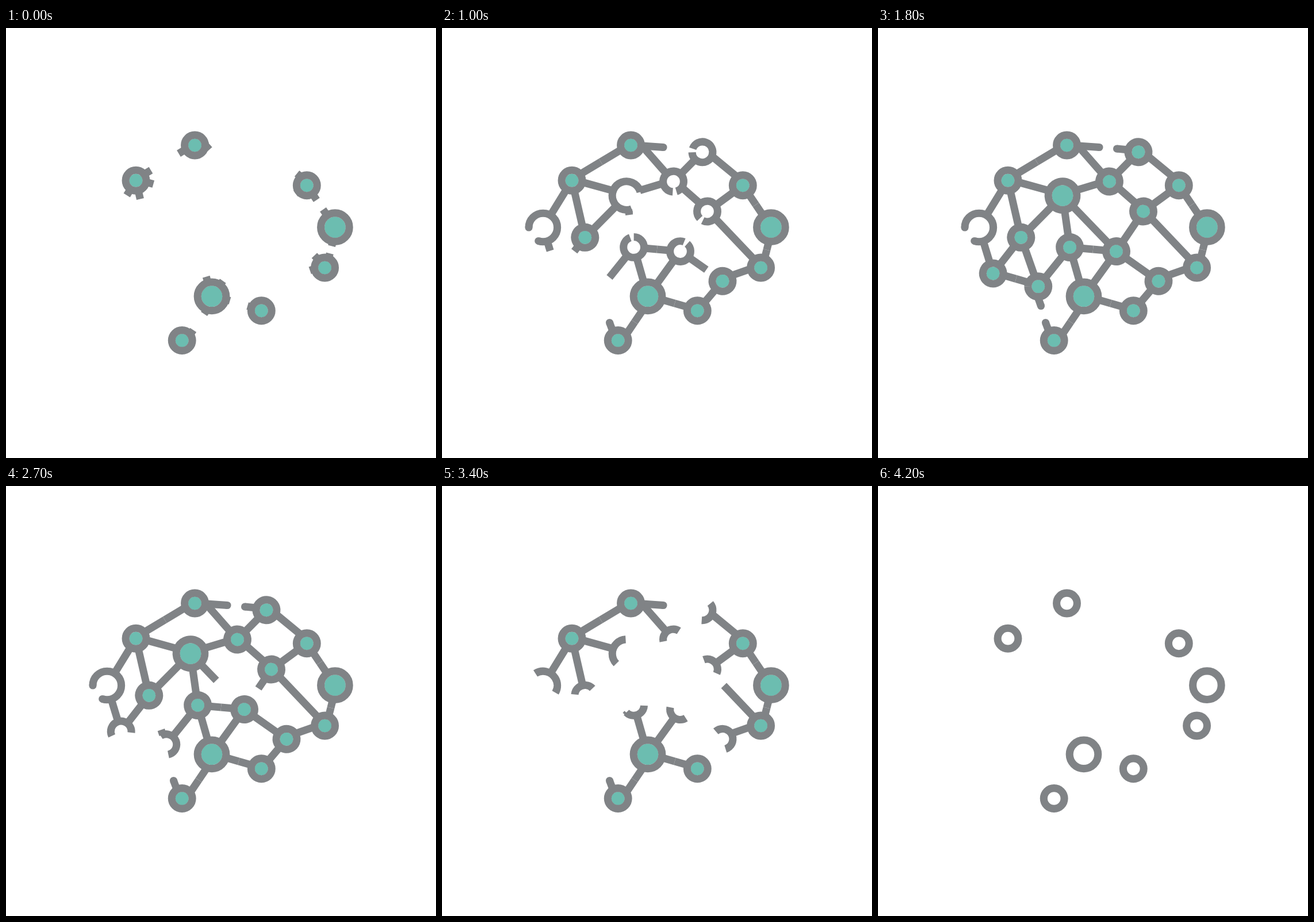
An HTML page with a canvas that plays this animation: 748 px wide and 748 px high, repeating every 4.7 s.

```html
<!DOCTYPE html>
<html lang="en">
<head>
<meta charset="utf-8">
<title>Node network</title>
<style>
  html, body { margin: 0; width: 100%; height: 100%; overflow: hidden; background: #fff; }
  canvas { display: block; }
</style>
</head>
<body>
<canvas id="stage" width="748" height="748"></canvas>
<script>
const ctx = document.getElementById('stage').getContext('2d');
const GRAY = '#808386', TEAL = '#6cbdb0';
const WIDTH = 13.1, SMALL = 17.9, BIG = 24.8, STEP = 100, LOOP = 4700;

// grow: first step, last step, arrival angle, counter-clockwise and clockwise sweep
const node = (x, y, r = SMALL, grow = null) => ({ x, y, r, grow });
const nodes = {
  A: node(328.5, 204),
  B: node(226, 265.2),
  C: node(523.3, 273.8),
  D: node(572.4, 346.7, BIG),
  E: node(554.6, 417),
  F: node(358, 466.8, BIG),
  G: node(444.3, 491.8),
  H: node(306.2, 543.5),
  I: node(453, 215.8, SMALL, [3.4, 10.4, 39, 212, 148]),
  J: node(402.5, 267, SMALL, [3.4, 10.4, 218, 132, 228]),
  K: node(321, 291.6, BIG, [2.4, 12.3, 195.6, 165, 195]),
  L: node(461.5, 319, SMALL, [3.4, 10.4, -36.5, 198, 162]),
  M: node(248.8, 364.3, SMALL, [4.1, 9.3, 252, 183, 177]),
  N: node(333.6, 381.4, SMALL, [3.4, 10.4, 62, 161, 199]),
  O: node(414.5, 388.6, SMALL, [3.4, 10.4, 126, 184, 176]),
  P: node(488, 440.3, SMALL, [3, 8.3, -19.5, 197, 163]),
  Q: node(200.2, 427, SMALL, [11, 14.4, 275, 205, 155]),
  R: node(278.8, 449.6, SMALL, [10.2, 15.2, -51, 129, 231]),
  S: node(175.8, 347, BIG, [3.2, 8.5, -58, 122, 167]),
  T: node(347, 204, 0)
};

// "XY" grows from X to Y, "X=Y" grows from both ends and meets halfway
const edges = [
  [-1.2, 2.5, 'A=B F=H F=G'],
  [-2.5, 2, 'C=D D=E'],
  [-1, 3.3, 'BM BK BS EP FN'],
  [-0.6, 3.3, 'TJ CI CL FO'],
  [-0.9, 8, 'EL'],
  [6, 8.5, 'KM N=O'],
  [5.6, 10.2, 'NR'],
  [6, 10, 'JK'],
  [6.5, 10, 'IJ LJ PG'],
  [6.6, 11.5, 'OP'],
  [8.5, 12, 'SQ'],
  [9.4, 11.5, 'MQ'],
  [9.3, 13, 'KN'],
  [10.7, 15.7, 'LO'],
  [11.4, 15.1, 'KO'],
  [12.3, 16.5, 'RM'],
  [13, 16.5, 'Q=R']
];

// Edges that run beside the line between centres, in px to the right of travel
const shift = {
  'F=H': -6, CI: 5, EP: 4, 'A=B': 2, BK: -2, 'D=E': -2.4,
  EL: 1.5, 'F=G': -1.3, JK: 2, LJ: 2, 'Q=R': -2
};

const stubs = [
  [-0.3, 3, 349, 205, 385, 207.5],
  [-0.3, 3, 298, 530, 291.5, 512.5],
  [10.5, 13, 436, 212, 415.5, 210],
  [13, 16, 277, 465, 283.5, 483.5]
];

const progress = (k, from, to) => Math.min(1, Math.max(0, (k - from) / (to - from)));
const rad = deg => deg * Math.PI / 180;

function dot(x, y, r, color) {
  ctx.fillStyle = color;
  ctx.beginPath();
  ctx.arc(x, y, r, 0, 2 * Math.PI);
  ctx.fill();
}

function line(x1, y1, x2, y2, p) {
  if (p <= 0) return;
  ctx.beginPath();
  ctx.moveTo(x1, y1);
  ctx.lineTo(x1 + (x2 - x1) * p, y1 + (y2 - y1) * p);
  ctx.stroke();
}

function drawEdge(key, p) {
  const a = nodes[key[0]], b = nodes[key[key.length - 1]], both = key[1] === '=';
  const dx = b.x - a.x, dy = b.y - a.y, d = Math.hypot(dx, dy), side = shift[key] || 0;
  const at = s => [a.x + (dx * s - dy * side) / d, a.y + (dy * s + dx * side) / d];
  const start = at(a.r), end = at(d - b.r);
  line(...start, ...end, both ? p / 2 : p);
  if (both) line(...end, ...start, p / 2);
}

function drawNode(id, k) {
  const { x, y, r, grow } = nodes[id];
  const open = id === 'S';
  if (!r) return;
  const [from, to, angle, ccw, cw] = grow || [-9, -8, 0, 180, 180];
  const p = progress(k, from, to);
  if (p <= 0) return;
  if (p === 1 && !open) {
    const fill = k >= 0 ? 1 : k === -1 ? 0.6 : 0;
    dot(x, y, (r - WIDTH / 2 + 0.2) * fill, TEAL);
  }
  const a0 = rad(angle - ccw * p), a1 = rad(angle + cw * p);
  ctx.beginPath();
  ctx.arc(x, y, r, a0, a1);
  ctx.stroke();
  if (p === 1 && open) {
    for (const a of [a0, a1]) {
      dot(x + r * Math.cos(a), y + r * Math.sin(a), WIDTH / 2, GRAY);
    }
  }
}

function draw(k) {
  ctx.fillStyle = '#fff';
  ctx.fillRect(0, 0, 748, 748);
  ctx.strokeStyle = GRAY;
  ctx.lineWidth = WIDTH;
  if (k >= 0) {
    for (const [from, to, list] of edges) {
      for (const key of list.split(' ')) drawEdge(key, progress(k, from, to));
    }
    for (const [from, to, ...pts] of stubs) {
      const p = progress(k, from, to);
      line(...pts, p);
      if (p === 1) dot(pts[2], pts[3], WIDTH / 2, GRAY);
    }
  }
  for (const id in nodes) drawNode(id, k);
}

// Builds up, rests, then runs backwards past the start and rests again
function stepAt(ms) {
  const n = Math.floor(ms / STEP);
  return n < 23 ? Math.min(n, 18) : Math.max(40 - n, -2);
}

let shown = null;
function tick() {
  const k = stepAt(performance.now() % LOOP);
  if (k !== shown) draw(shown = k);
  requestAnimationFrame(tick);
}
tick();
</script>
</body>
</html>
```
